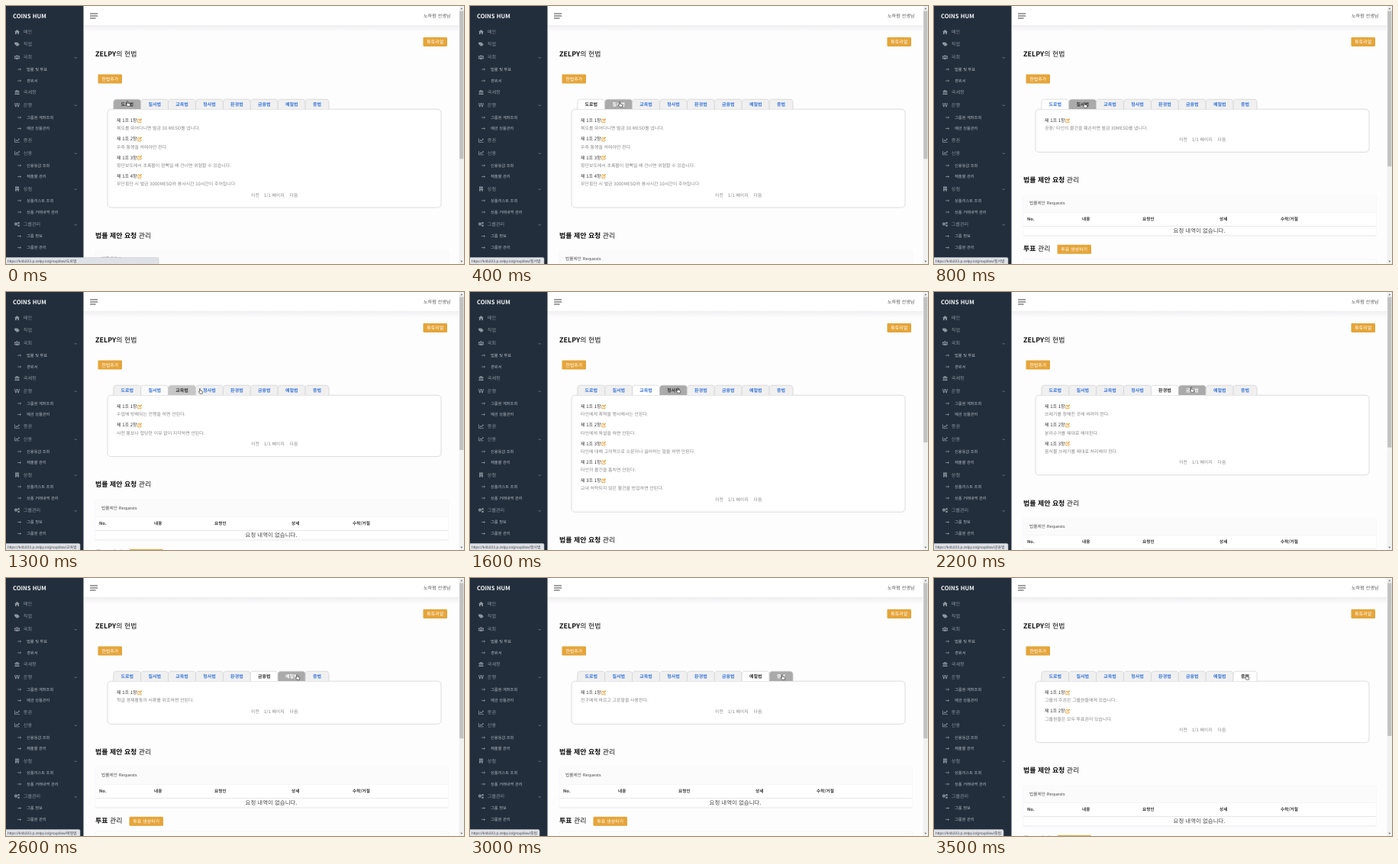
These frames come from a looping animation (600 px wide and 338 px high, 3700 ms). An HTML page:

```html
<!DOCTYPE html>
<html lang="ko">
<head>
<meta charset="utf-8">
<title>헌법 관리</title>
<style>
html, body { margin: 0; width: 100%; height: 100%; overflow: hidden; background: #fdfdfe; }
svg { display: block; width: 100%; height: 100%; }
text { font-family: "Noto Sans CJK KR", "Noto Sans CJK JP", "Noto Sans CJK", sans-serif; text-rendering: geometricPrecision; white-space: pre; }
.url { font-family: "Liberation Sans", "Noto Sans CJK KR", "Noto Sans CJK JP", sans-serif; }
</style>
</head>
<body>
<svg id="stage" viewBox="0 0 600 338" preserveAspectRatio="none">
  <defs>
    <linearGradient id="shade" x1="0" y1="0" x2="0" y2="1">
      <stop offset="0" stop-color="#efeff1"/><stop offset="1" stop-color="#fdfdfe"/>
    </linearGradient>
  </defs>
</svg>
<script>
const LOOP = 3700, STEP = 100, ROW = 24.2;
const ORANGE = '#e5a53a', BLUE = '#3a76d8', INK = '#333', MUTED = '#868686';

// hover and click: moments at which the pointer enters and selects each tab
const laws = [
  { name: '도로법', hover: -100, click: 0, items: [
    '복도를 뛰어다니면 벌금 30 MESO를 냅니다.', '우측 통행을 하여야만 한다.',
    '횡단보도에서 초록불이 깜빡일 때 건너면 위험할 수 있습니다.',
    '무단횡단 시 벌금 3000MESO와 봉사시간 10시간이 주어집니다.'] },
  { name: '질서법', hover: 200, click: 800, items: ['공용/ 타인의 물건을 훼손하면 벌금 30MESO를 냅니다.'] },
  { name: '교육법', hover: 1000, click: 1200, items: [
    '수업에 방해되는 언행을 하면 안된다.', '사전 통보나 합당한 이유 없이 지각하면 안된다.'] },
  { name: '형사법', hover: 1400, click: 1600, titles: ['1조 1항', '1조 2항', '1조 3항', '2조 1항', '3조 1항'], items: [
    '타인에게 폭력을 행사해서는 안된다.', '타인에게 욕설을 하면 안된다.',
    '타인에 대해 고의적으로 소문이나 싫어하는 말을 하면 안된다.',
    '타인의 물건을 훔치면 안된다.', '교내 허락되지 않은 물건을 반입하면 안된다.'] },
  { name: '환경법', hover: 1700, click: 1900, items: [
    '쓰레기를 정해진 곳에 버려야 한다.', '분리수거를 제대로 해야한다.', '음식물 쓰레기를 제대로 처리해야 한다.'] },
  { name: '금융법', hover: 2000, click: 2300, items: ['학급 경제활동의 서류를 위조하면 안된다.'] },
  { name: '예절법', hover: 2500, click: 2700, items: ['친구에게 바르고 고운말을 사용한다.'] },
  { name: '중법', hover: 2900, click: 3200, items: [
    '그룹의 주권은 그룹원들에게 있습니다.', '그룹원들은 모두 투표권이 있습니다.'] },
];

// time, x, y
const pointerPath = [
  [0, 160, 128], [100, 160, 128], [400, 197, 129], [800, 198, 130], [900, 198, 130],
  [1100, 234, 130], [1200, 236, 130], [1300, 255, 130], [1400, 268, 130], [1600, 273, 129],
  [1800, 303, 128], [1900, 306, 128], [2200, 338, 128], [2300, 339, 128],
  [2600, 382, 130], [2800, 382, 130], [3000, 410, 130], [LOOP, 410, 130],
];

const stage = document.getElementById('stage');

function add(parent, tag, attrs, content) {
  const node = document.createElementNS('http://www.w3.org/2000/svg', tag);
  for (const key in attrs) node.setAttribute(key, attrs[key]);
  if (content) node.textContent = content;
  return parent.appendChild(node);
}
const box = (p, x, y, width, height, fill, more) => add(p, 'rect', { x, y, width, height, fill, ...more });
const path = (p, d, more) => add(p, 'path', { d, fill: 'none', ...more });
// cy is the vertical middle of the line of text
const label = (p, x, cy, size, fill, content, more) =>
  add(p, 'text', { x, y: cy + size * .37, 'font-size': size, fill, ...more }, content);

const BOLD = { 'font-weight': 700 }, MID = { 'text-anchor': 'middle' };

function button(p, x, y, width, content) {
  box(p, x, y, width, 12, ORANGE, { rx: 1.2 });
  label(p, x + width / 2, y + 6, 6, '#fff', content, MID);
}

function heading(p, cy, strong, rest) {
  const node = label(p, 117, cy, 8.95, '#111', '');
  add(node, 'tspan', BOLD, strong);
  add(node, 'tspan', {}, rest);
}

function drawSidebar() {
  const icons = {
    home: 'M-3.5 0L0-3 3.5 0H2.5V3H.8V1H-.8V3H-2.5V0Z',
    tag: 'M-3.4-2.6H-.6L2.2.2-.4 2.8-3.4-.2ZM.4-2.6L3.4.2.8 2.8.2 2.3 2.2.2-.6-2.6Z',
    people: 'M-1.2-2.6H1.2V-.4H-1.2ZM-3.4-1.8H-1.8V0H-3.4ZM1.8-1.8H3.4V0H1.8ZM-2 .4H2V2.8H-2ZM-3.6.5H-2.4V2.2H-3.6ZM2.4.5H3.6V2.2H2.4Z',
    bank: 'M-3.2-1.2L0-3 3.2-1.2V-.6H-3.2ZM-2.4-.2H-1.4V1.8H-2.4ZM-.5-.2H.5V1.8H-.5ZM1.4-.2H2.4V1.8H1.4ZM-3.2 2.1H3.2V3H-3.2Z',
    won: 'M-3.4-2.6H-2.4L-1.6 1-.6-2.6H.6L1.6 1 2.4-2.6H3.4L2.2 2.8H1.1L0-1-1.1 2.8H-2.2ZM-3.6-.6H3.6V.2H-3.6Z',
    chart: 'M-3.3-2.6H-2.5V2H3.3V2.7H-3.3ZM-2 .8L-.6-.9.5.1 2-1.6 1.3-2.3H3.2V-.4L2.6-1 .5 1.2-.6.2-1.5 1.4Z',
    store: 'M-2.4-3H2.4V3H.7V1.4H-.7V3H-2.4ZM-1.5-2.1V-1.2H-.5V-2.1ZM.5-2.1V-1.2H1.5V-2.1ZM-1.5-.5V.4H-.5V-.5ZM.5-.5V.4H1.5V-.5Z',
    gears: 'M-3.6-.4A2.1 2.1 0 1 1 .6-.4 2.1 2.1 0 1 1-3.6-.4ZM-2.2-.4A.7.7 0 1 0-.8-.4.7.7 0 1 0-2.2-.4ZM.8-1.8A1.3 1.3 0 1 1 3.4-1.8 1.3 1.3 0 1 1 .8-1.8ZM.8 1.7A1.3 1.3 0 1 1 3.4 1.7 1.3 1.3 0 1 1 .8 1.7Z',
  };
  // middle, text, icon, opens a submenu
  const menu = [
    [34, '메인', 'home'], [50, '직업', 'tag'],
    [67, '국회', 'people', 1], [83, '법률 및 투표'], [98, '경위서'],
    [113, '국세청', 'bank'],
    [129.5, '은행', 'won', 1], [146, '그룹원 계좌조회'], [160.5, '예금 상품관리'],
    [176, '증권', 'chart'],
    [192.5, '신용', 'chart', 1], [209, '신용등급 조회'], [223.5, '제출물 관리'],
    [239.5, '상점', 'store', 1], [255, '상품리스트 조회'], [270, '상품 거래내역 관리'],
    [286, '그룹관리', 'gears', 1], [301.5, '그룹 정보'], [316.5, '그룹원 관리'],
  ];
  box(stage, 0, 0, 101.5, 338, '#222e3c');
  label(stage, 9, 13, 7.65, '#f4f5f6', 'COINS HUM', BOLD);
  for (const [y, name, icon, opens] of menu) {
    if (icon) {
      path(stage, icons[icon], { transform: `translate(14.5 ${y})`, fill: '#8d959f', 'fill-rule': 'evenodd' });
      label(stage, 22.8, y, 6.1, '#8d959f', name);
    } else {
      path(stage, `M15 ${y}h4.6m-1.4-1.2l1.4 1.2-1.4 1.2`, { stroke: '#a9b0b8', 'stroke-width': .6 });
      label(stage, 27, y, 5.25, '#b3b9c0', name);
    }
    if (opens) path(stage, `M89.8 ${y}l1.5 1.5 1.5-1.5`, { stroke: '#8d959f', 'stroke-width': .7 });
  }
}

function drawTop() {
  box(stage, 101.5, 25, 492, 9, 'url(#shade)');
  box(stage, 101.5, 0, 492, 25, '#fff');
  path(stage, 'M110.5 10h9.2M110.5 13h9.2M110.5 16h6.6', { stroke: '#444', 'stroke-width': 1.2, 'stroke-linecap': 'round' });
  label(stage, 547, 12.5, 6.1, '#555', '노하람 선생님');
  button(stage, 546.5, 41, 31.5, '튜토리얼');
  heading(stage, 62.5, 'ZELPY', '의 헌법');
  button(stage, 120.5, 89.5, 31.5, '헌법추가');
}

function drawLower() {
  const g = add(stage, 'g', {});
  heading(g, 228, '법률 제안 요청', ' 관리');
  box(g, 116.5, 247, 463, 55, '#f4f4f5', { rx: 2 });
  box(g, 117, 247, 462, 54, '#fff', { rx: 2 });
  box(g, 117, 247, 462, 23, '#fbfbfc');
  label(g, 125, 258.3, 5.7, '#555', '법률제안 Requests', { class: 'url' });
  box(g, 117, 270, 462, .6, '#eee');
  [[122, 'No.'], [194, '내용'], [273, '요청인'], [374, '상세'], [454, '수락/거절']]
    .forEach(([x, name]) => label(g, x, 279, 5.65, INK, name, BOLD));
  box(g, 117, 288, 462, .7, '#dedfe2');
  label(g, 347.5, 294, 7.45, '#484848', '요청 내역이 없습니다.', MID);
  box(g, 117, 300, 462, .6, '#e6e7ea');
  heading(g, 318, '투표', ' 관리');
  button(g, 161.5, 312.7, 44.5, '투표 생성하기');
  box(g, 116.5, 331.5, 463, 60, '#f1f1f3', { rx: 2 });
  box(g, 117, 332, 462, 60, '#fcfcfd', { rx: 2 });
  return g;
}

function drawArticles(law) {
  const g = add(stage, 'g', {});
  law.items.forEach((line, i) => {
    const y = 150 + i * ROW, number = law.titles ? law.titles[i] : `1조 ${i + 1}항`;
    label(g, 145, y, 6, INK, `제 ${number}`, { 'font-weight': 500 });
    path(g, `M175.6 ${y - 1.6}h-2.9v4.3h4.3v-2.2`, { stroke: ORANGE, 'stroke-width': .9 });
    path(g, `M174.3 ${y + 1.1}l.3-1.3 2.6-2.6 1 1-2.6 2.6z`, { fill: ORANGE });
    label(g, 145, y + 10.2, 5.95, MUTED, line);
  });
  const y = 151 + law.items.length * ROW - .4;
  [[321, '이전'], [338, '1/1 페이지'], [371.5, '다음']].forEach(([x, s]) => label(g, x, y, 5.85, MUTED, s));
  return g;
}

function drawTab(law, i) {
  const x = 140.8 + i * 35.9, width = i === 7 ? 31 : 36;
  const shape = path(stage, `M${x} 135v-8.5q0-4.3 4.3-4.3h${width - 8.6}q4.3 0 4.3 4.3v8.5`,
    { stroke: '#cfcfcf', 'stroke-width': .7 });
  const name = label(stage, x + width / 2, 128.3, 6, BLUE, law.name, { ...BOLD, ...MID });
  return { shape, name };
}

drawTop();
const lower = drawLower();
const panel = box(stage, 133, 135.2, 437, 56, '#fff', { rx: 4.5, stroke: '#d3d3d5', 'stroke-width': .8 });
const articles = laws.map(drawArticles);
const tabs = laws.map(drawTab);
drawSidebar();

box(stage, 593.5, 0, 6.5, 338, '#f1f1f1');
const thumb = box(stage, 594.2, 6.5, 5.2, 200, '#c1c1c1');
path(stage, 'M595.2 4.2l1.6-2 1.6 2z', { fill: '#777' });
path(stage, 'M595.2 333.8l1.6 2 1.6-2z', { fill: '#777' });

const status = box(stage, -2, 329.6, 200, 12, '#dee1e6', { rx: 1.5, stroke: '#c3c6ca', 'stroke-width': .5 });
const address = label(stage, 2, 334, 4.95, '#4c4f53', '', { class: 'url' });
const pointer = path(stage,
  'M-1.5-3.2q.7-.7 1.3 0V-.6l2.3.5q.8.2.7 1L2.4 3.2H-1L-2.8.9q0-.9 1.3-.2z',
  { fill: '#fff', stroke: '#222', 'stroke-width': .6 });

const ramp = (t, start, length) => Math.min(1, Math.max(0, (t - start) / length));

function tabShade(i, t) {
  const { hover, click } = laws[i], left = laws[i + 1] ? laws[i + 1].click : Infinity;
  return 240 - 70 * ramp(t, hover - 40, 100) + 85 * ramp(t, click, 300) - 15 * ramp(t, left, 300);
}

function pointerAt(t) {
  const k = pointerPath.findIndex(p => p[0] > t);
  const a = pointerPath[k - 1], b = pointerPath[k], u = ramp(t, a[0], b[0] - a[0]);
  return [a[1] + (b[1] - a[1]) * u, a[2] + (b[2] - a[2]) * u];
}

const latest = (key, t) => laws.reduce((found, law, i) => law[key] <= t ? i : found, 0);

function render(time) {
  const t = Math.floor(time % LOOP / STEP) * STEP;
  const active = latest('click', t), hovered = latest('hover', t), count = laws[active].items.length;

  tabs.forEach(({ shape, name }, i) => {
    const v = Math.round(tabShade(i, t));
    shape.setAttribute('fill', `rgb(${v},${v},${v})`);
    name.setAttribute('fill', i === active ? INK : i === hovered ? '#fff' : BLUE);
  });
  articles.forEach((g, i) => g.setAttribute('display', i === active ? 'inline' : 'none'));
  panel.setAttribute('height', 32 + count * ROW);
  lower.setAttribute('transform', `translate(0 ${(count - 1) * ROW})`);
  thumb.setAttribute('height', 207 - count * 3.3);

  const name = laws[hovered].name;
  address.textContent = 'https://k4b203.p.zelpy.io/group/law/' + name;
  status.setAttribute('width', hovered === 0 ? 202 : name.length === 3 ? 99 : 93);
  pointer.setAttribute('transform', `translate(${pointerAt(t).join(' ')})`);
}

const started = performance.now();
function tick() {
  render(performance.now() - started);
  requestAnimationFrame(tick);
}
tick();
</script>
</body>
</html>
```
